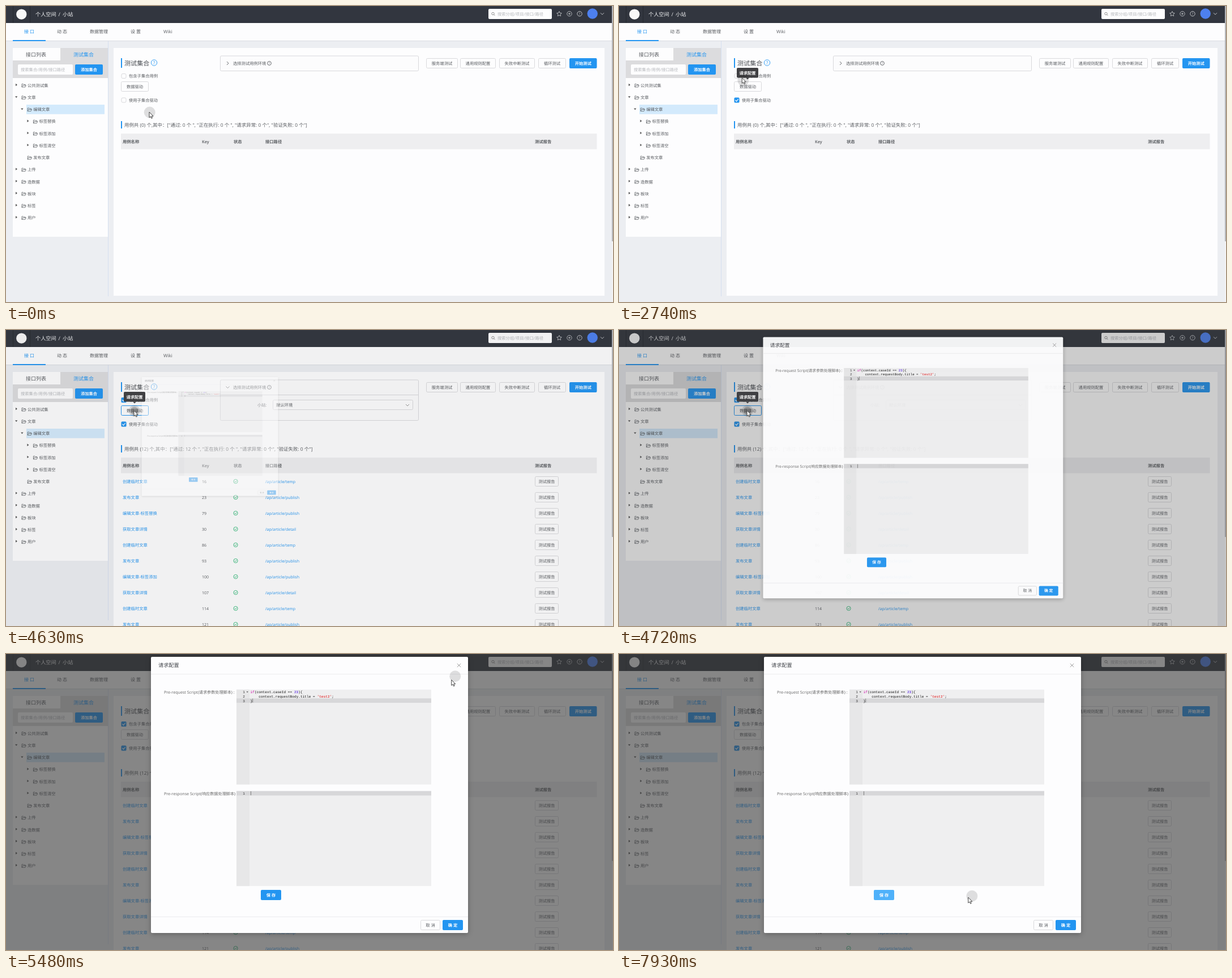
Write an HTML page that moves like this. It is 1072 by 522 pixels and loops after 8000 ms.

```html
<!DOCTYPE html>
<html lang="zh-CN">
<head>
<meta charset="utf-8">
<style>
  html, body { margin: 0; width: 100%; height: 100%; overflow: hidden; background: #eceef2; }
  svg { display: block; width: 100vw; height: 100vh; }
  text { font-family: 'Open Sans', 'Noto Sans CJK SC', 'Noto Sans CJK', sans-serif; text-rendering: geometricPrecision; white-space: pre; }
  .code { font-family: 'Liberation Mono', monospace; }
</style>
</head>
<body>
<svg id="stage" viewBox="0 0 1072 522"></svg>
<script>
const LOOP = 8000, FRAME = 94.4, FIRST_FRAME = 88;
const BLUE = '#2395f1', INK = '#595c60', WHITE = '#fdfdfe', LINE = '#d9d9dc', PALE = '#b5b7bb';

// ---- drawing helpers; text is placed by its vertical centre ----
const rect = (x, y, w, h, fill, extra = '') =>
  `<rect x="${x}" y="${y}" width="${w}" height="${h}" fill="${fill}" ${extra}/>`;
const circle = (x, y, r, fill, extra = '') =>
  `<circle cx="${x}" cy="${y}" r="${r}" fill="${fill}" ${extra}/>`;
const stroke = (d, color = INK, width = 0.8, extra = '') =>
  `<path d="${d}" fill="none" stroke="${color}" stroke-width="${width}" ${extra}/>`;
const text = (x, y, str, size = 7.3, fill = INK, extra = '') =>
  `<text x="${x}" y="${y + size * 0.37}" font-size="${size}" fill="${fill}" ${extra}>${str}</text>`;
const group = (id, content, extra = '') => `<g id="${id}" ${extra}>${content}</g>`;
const bold = 'font-weight="600"', centered = 'text-anchor="middle"';
const outlined = `stroke="${LINE}" rx="2"`;

function button(x, y, w, label, primary = false, id = '') {
  const box = primary ? rect(x, y, w, 18, BLUE, `rx="2" ${id && `id="${id}"`}`)
                      : rect(x + .5, y + .5, w - 1, 17, WHITE, `${outlined} ${id && `id="${id}"`}`);
  return box + text(x + w / 2, y + 9, label, 7.3, primary ? '#fff' : INK, centered + (primary ? ' ' + bold : ''));
}
const question = (x, y, r, color, size) =>
  circle(x, y, r, 'none', `stroke="${color}" stroke-width=".9"`) + text(x, y, '?', size, color, centered);
const chevron = (x, y, color = INK) => stroke(`M${x - 3} ${y - 1.5}l3 3l3-3`, color, .9);
const magnifier = (x, y) => stroke(`M${x + 1.5} ${y + 1.5}l2 2`, '#777') + circle(x, y, 2.2, 'none', 'stroke="#777" stroke-width=".8"');

function checkbox(id, y, label) {
  const tick = rect(203.5, y - 4.5, 9, 9, BLUE, 'rx="1.5"') + stroke(`M205.5 ${y}l2 2l3.2-4`, '#fff', 1.2);
  return rect(204, y - 4, 8, 8, WHITE, `id="${id}Box" ${outlined}`) + group(id, tick) + text(217, y, label);
}

function header() {
  const star = 'M977 9.5l1.3 2.7l3 .4l-2.2 2.1l.5 3l-2.6-1.4l-2.6 1.4l.5-3l-2.2-2.1l3-.4z';
  const icon = '#d0d2d5';
  return rect(0, 0, 1072, 30, '#32363f') + stroke('M12.5 0V30M42.5 0V30', '#262a30', 1) +
    circle(27.3, 14.6, 9.2, '#f8f8f8') +
    text(52, 15, '个人空间', 9.15, '#f4f5f6') + text(92.5, 15, '/', 9.15, '#f4f5f6') + text(100, 15, '小站', 9.15, '#f4f5f6') +
    rect(852, 5, 112, 18, WHITE, 'rx="2"') + magnifier(860, 13.5) + text(868, 14.5, '搜索分组/项目/接口/路径', 7.3, PALE) +
    stroke(star, icon) + circle(995, 13.7, 4.2, 'none', `stroke="${icon}" stroke-width=".8"`) +
    stroke('M993 13.7h4M995 11.7v4', icon) + question(1013, 13.7, 4.2, icon, 6) +
    circle(1035.7, 13.5, 9.2, '#4d80ef') + chevron(1053, 13.7, icon);
}

function navigation() {
  const items = [[32, '接 口'], [90, '动 态'], [148, '数据管理'], [220, '设 置'], [278, 'Wiki']];
  return rect(0, 30, 1072, 31, WHITE) + rect(0, 61, 1072, 1, '#d9dce1') + rect(12, 60, 58, 2, BLUE) +
    items.map(([x, label], i) => text(x, 45.5, label, 8, i ? INK : BLUE)).join('');
}

function sidebar() {
  // depth, label, caret state
  const tree = [[0, '公共测试集', 'shut'], [0, '文章', 'open'], [1, '编辑文章', 'open'], [2, '标签替换', 'shut'],
    [2, '标签添加', 'shut'], [2, '标签清空', 'shut'], [1, '发布文章', ''], [0, '上传', 'shut'],
    [0, '造数据', 'shut'], [0, '板块', 'shut'], [0, '标签', 'shut'], [0, '用户', 'shut']];
  const rows = tree.map(([depth, label, caret], i) => {
    const x = 18 + depth * 10.2, y = 140 + i * 21.23;
    const arrow = { shut: `M${x - 1} ${y - 3.2}l3 2.2l-3 2.2z`, open: `M${x - 2} ${y - 2}h4.4l-2.2 2.8z` }[caret];
    const folder = `M${x + 10} ${y + 3}v-5.5h2.4l1 1h2.8v1.5M${x + 10} ${y + 3}l1.4-3h6l-1.5 3z`;
    return (arrow ? `<path d="${arrow}" fill="#555"/>` : '') + stroke(folder, INK, .75) + text(x + 20, y, label);
  }).join('');
  return rect(180, 62, 1, 450, '#d5dff0') + rect(12, 74, 168, 333, WHITE) +
    rect(96, 74, 84, 23, '#dcdcde') + rect(12, 96, 168, 31, '#dcdcde') +
    text(35, 85.5, '接口列表', 9) + text(119, 85.5, '测试集合', 9, BLUE) +
    rect(21, 103, 97, 18, WHITE, 'rx="2"') + text(26, 112, '搜索集合/用例/接口路径', 7.3, PALE) +
    button(122, 103, 49, '添加集合', true) + rect(36, 174, 138, 16.7, '#d3eafc') + rows;
}

function summary(count) {
  return `用例共 (${count}) 个,其中：["通过: ${count} 个 ", "正在执行: 0 个 ", "请求异常: 0 个", "验证失败: 0 个"]`;
}

function environment() {
  const body = stroke('M378.5 114.5H728.5', LINE, 1) + text(444, 132.5, '小站:') +
    rect(471.5, 123.5, 247, 17, WHITE, outlined) + text(477, 132.5, '默认环境') + chevron(709, 132.5, '#888');
  return rect(378.5, 88, 350, 26.5, '#fcfcfd', `id="envFrame" ${outlined}`) +
    group('envArrow', chevron(391.5, 101)) + text(401, 101, '选择测试用例环境') + question(465, 101, 3.4, INK, 5) +
    group('envBody', body);
}

function table() {
  const names = ['创建临时文章', '发布文章', '编辑文章-标签替换', '获取文章详情', '创建临时文章',
    '发布文章', '编辑文章-标签添加', '获取文章详情', '创建临时文章', '发布文章'];
  const keys = [16, 23, 79, 30, 86, 93, 100, 107, 114, 121];
  const action = name => name.startsWith('创建') ? 'temp' : name.startsWith('获取') ? 'detail' : 'publish';
  return names.map((name, i) => {
    const y = 267 + i * 28;
    return text(206, y, name, 7.3, BLUE) + text(346, y, keys[i], 7) +
      circle(405.6, y, 3.6, 'none', 'stroke="#2bb673" stroke-width=".9"') +
      stroke(`M403.8 ${y}l1.4 1.4l2.2-2.6`, '#2bb673', .9) +
      text(458, y, '/ap/article/' + action(name), 7, BLUE) + button(934, y - 9, 42, '测试报告');
  }).join('');
}

function mainPanel() {
  const columns = [[206, '用例名称'], [346, 'Key'], [402, '状态'], [458, '接口路径'], [934, '测试报告']];
  const actions = [[742, 56, '服务端测试'], [802, 63, '通用规则配置'], [871, 63, '失败中断测试'], [940, 49, '循环测试']];
  return rect(190, 74, 867, 437, WHITE, 'id="panel"') +
    rect(203, 92, 2, 17, BLUE) + text(209, 100.5, '测试集合', 11.1, '#4a4d52') + question(261.5, 100, 5.2, BLUE, 8) +
    environment() + actions.map(([x, w, label]) => button(x, 92, w, label)).join('') + button(995, 92, 48.5, '开始测试', true) +
    checkbox('withChildren', 123.5, '包含子集合用例') + button(203, 133, 49, '数据驱动', false, 'dataButton') +
    checkbox('useChildren', 166, '使用子集合驱动') +
    rect(203, 203, 2, 13, BLUE) + text(209, 209.5, '', 8.45, INK, 'id="summary"') +
    rect(203, 225, 840.5, 27.5, '#eeeef0') +
    columns.map(([x, label]) => text(x, 239, label, 7.3, INK, bold)).join('') + group('rows', table());
}

function editor(y, label, lines) {
  const active = y + (lines.length - 1) * 7.8;
  const fold = lines.length > 1 ? `<path d="M424.5 ${y + 3.2}h3.4l-1.7 2.4z" fill="#666"/>` : '';
  return text(279, y + 4.6, label + ' :', 7.15, '#666') +
    rect(407, y, 344, 167.5, '#efeff0') + rect(407, y, 23, 167.5, '#e7e7e8') + rect(407, active, 344, 7.8, '#d7d7d9') +
    lines.map(([x, line], i) => text(422, y + 4.2 + i * 7.8, i + 1, 6.15, '#333', 'class="code" text-anchor="end"') +
      text(x, y + 4.2 + i * 7.8, line, 6.15, '#111', 'class="code"')).join('') + fold +
    rect(lines.length > 1 ? 435.3 : 432, active + .4, .8, 7, '#666');
}

function modal() {
  const paint = (color, str) => `<tspan fill="${color}">${str}</tspan>`;
  const request = [
    [431.5, paint('#c800a4', 'if') + '(context.caseId == ' + paint('#3a00dc', '23') + '){'],
    [446.3, 'context.requestBody.title = ' + paint('#df0002', "'test2'") + ';'],
    [431.5, '}']];
  return rect(256, 5, 560, 487, WHITE, 'rx="2" style="filter:drop-shadow(0 2px 4px #0004)"') +
    text(269, 20, '请求配置', 9.2, '#45484d') + stroke('M796.8 16.8l6.4 6.4m0-6.4l-6.4 6.4', '#888') +
    rect(256, 35, 560, 1, '#ececee') + rect(256, 463, 560, 1, '#ececee') +
    editor(62.7, 'Pre-request Script(请求参数处理脚本)', request) +
    editor(241.7, 'Pre-response Script(响应数据处理脚本)', [[431.5, '']]) +
    rect(450, 416, 36, 18, 'none', `id="wave" rx="3" stroke="${BLUE}"`) + button(450, 416, 36, '保 存', true, 'save') +
    button(732, 469, 35, '取 消') + button(771, 469, 36, '确 定', true);
}

const tooltip = rect(208, 109, 38, 17.5, '#404043', 'rx="2"') + '<path d="M224 126.5h6l-3 3z" fill="#404043"/>' +
  text(227, 118, '请求配置', 7.3, '#fff', centered + ' ' + bold);
const pointerStyle = 'fill="#fff" stroke="#333" stroke-width=".9" stroke-linejoin="round"';
const arrowPointer = `<path d="M0 0V9.8L2.3 7.8L3.9 11.2L5.5 10.5L4 7.2H7Z" ${pointerStyle}/>`;
const handPointer = `<path d="M-1 8V1.5a1.2 1.2 0 0 1 2.4 0V6l4 .8q1.5.5 1.3 2.5l-.8 4.7h-6l-3.5-4.6q-.8-1.3.4-1.6z" ${pointerStyle}/>`;

document.getElementById('stage').innerHTML =
  rect(0, 0, 1072, 522, '#eceef2') + header() + navigation() + sidebar() + mainPanel() +
  rect(1070, 0, 2, 522, '#f4f4f6') + rect(1070, 0, 2, 415, '#b4b5b8', 'id="scrollbar"') +
  rect(0, 0, 1072, 522, '#373737', 'id="mask"') + group('modal', modal()) + group('tooltip', tooltip) +
  group('halo', circle(0, 0, 10, '#000', 'opacity=".12"') + circle(0, 0, 7, '#000', 'id="press" opacity=".2"')) +
  group('pointer', group('arrow', arrowPointer) + group('hand', handPointer));

// ---- motion ----
const parts = Object.fromEntries([...document.querySelectorAll('[id]')].map(el => [el.id, el]));
const set = (id, attrs) => Object.entries(attrs).forEach(([k, v]) => parts[id].setAttribute(k, v));
const show = (id, on) => set(id, { opacity: +on });
const ramp = (t, from, to) => Math.min(1, Math.max(0, (t - from) / (to - from)));
const within = (t, spans) => spans.some(([from, to]) => t >= from && t < to);

const MOUSE = [[75, 253, 187], [170, 245, 177], [480, 245, 177], [1130, 210, 163], [2130, 210, 163],
  [2460, 224, 146], [2740, 217, 126], [2930, 208, 125], [4060, 207.5, 126], [4340, 226, 142], [4900, 226, 142],
  [5250, 800, 26], [5400, 794, 37], [5480, 785.5, 47], [5640, 690, 316], [6000, 560, 380], [6250, 456, 420],
  [6500, 467, 422], [7000, 467, 422], [7370, 652, 392], [7560, 656, 410], [7930, 616, 429.5]];
const CLICKS = [[1700, 1890], [3130, 3300], [4500, 4760], [6600, 6800]];
const HAND = [[1030, 2200], [2980, 4600], [6230, 7050]];
const TABLE_AT = 3560, MODAL_AT = 4590, SAVE_AT = 6700;

function mouseAt(t) {
  const next = MOUSE.findIndex(point => point[0] > t);
  if (next < 1) return (next ? MOUSE.at(-1) : MOUSE[0]).slice(1);
  const [t0, x0, y0] = MOUSE[next - 1], [t1, x1, y1] = MOUSE[next];
  const k = ramp(t, t0, t1);
  return [x0 + (x1 - x0) * k, y0 + (y1 - y0) * k];
}

function render(t) {
  const [x, y] = mouseAt(t), [haloX, haloY] = mouseAt(t - 55);
  const hand = within(t, HAND);
  set('pointer', { transform: `translate(${x} ${y})` });
  set('halo', { transform: `translate(${haloX + .7} ${haloY + .5})` });
  show('hand', hand);
  show('arrow', !hand);
  set('press', { opacity: within(t, CLICKS) ? .2 : 0 });

  show('useChildren', t >= 1880);
  show('withChildren', t >= 3220);
  set('useChildrenBox', { stroke: within(t, [[1100, 2200]]) ? BLUE : LINE });
  set('withChildrenBox', { stroke: within(t, [[2980, 4200]]) ? BLUE : LINE });
  set('dataButton', { stroke: within(t, [[2330, 2650], [4250, 5050]]) ? BLUE : LINE });
  set('tooltip', { opacity: Math.max(ramp(t, 2420, 2520) - ramp(t, 2780, 2880), ramp(t, 4380, 4480) - ramp(t, 5020, 5130)) });

  const loaded = t >= TABLE_AT, expand = ramp(t, TABLE_AT, TABLE_AT + 200);
  show('rows', loaded);
  parts.summary.textContent = summary(loaded ? 12 : 0);
  set('panel', { height: loaded ? 448 : 437 });
  set('scrollbar', { height: loaded ? 365 : 415 });
  set('envFrame', { height: 26.5 + 45 * expand });
  set('envBody', { opacity: expand });
  set('envArrow', { transform: `rotate(${-90 + 90 * expand} 391.5 101)` });

  const opening = ramp(t, MODAL_AT, MODAL_AT + 300), scale = 1 - (1 - opening) ** 5.5;
  set('mask', { opacity: .6 * opening });
  set('modal', { opacity: scale, transform: `translate(227 142) scale(${scale}) translate(-227 -142)` });

  const wave = ramp(t, SAVE_AT, SAVE_AT + 400), grow = 3 * wave;
  set('save', { fill: t >= 6300 ? '#4fb1fa' : BLUE });
  set('wave', { x: 450 - grow, y: 416 - grow, width: 36 + 2 * grow, height: 18 + 2 * grow,
    opacity: t >= SAVE_AT ? .4 * (1 - wave) : 0 });
}

function tick() {
  const t = performance.now() % LOOP;
  render(Math.max(0, FIRST_FRAME + Math.floor((t - FIRST_FRAME) / FRAME) * FRAME));
  requestAnimationFrame(tick);
}
tick();
</script>
</body>
</html>
```
